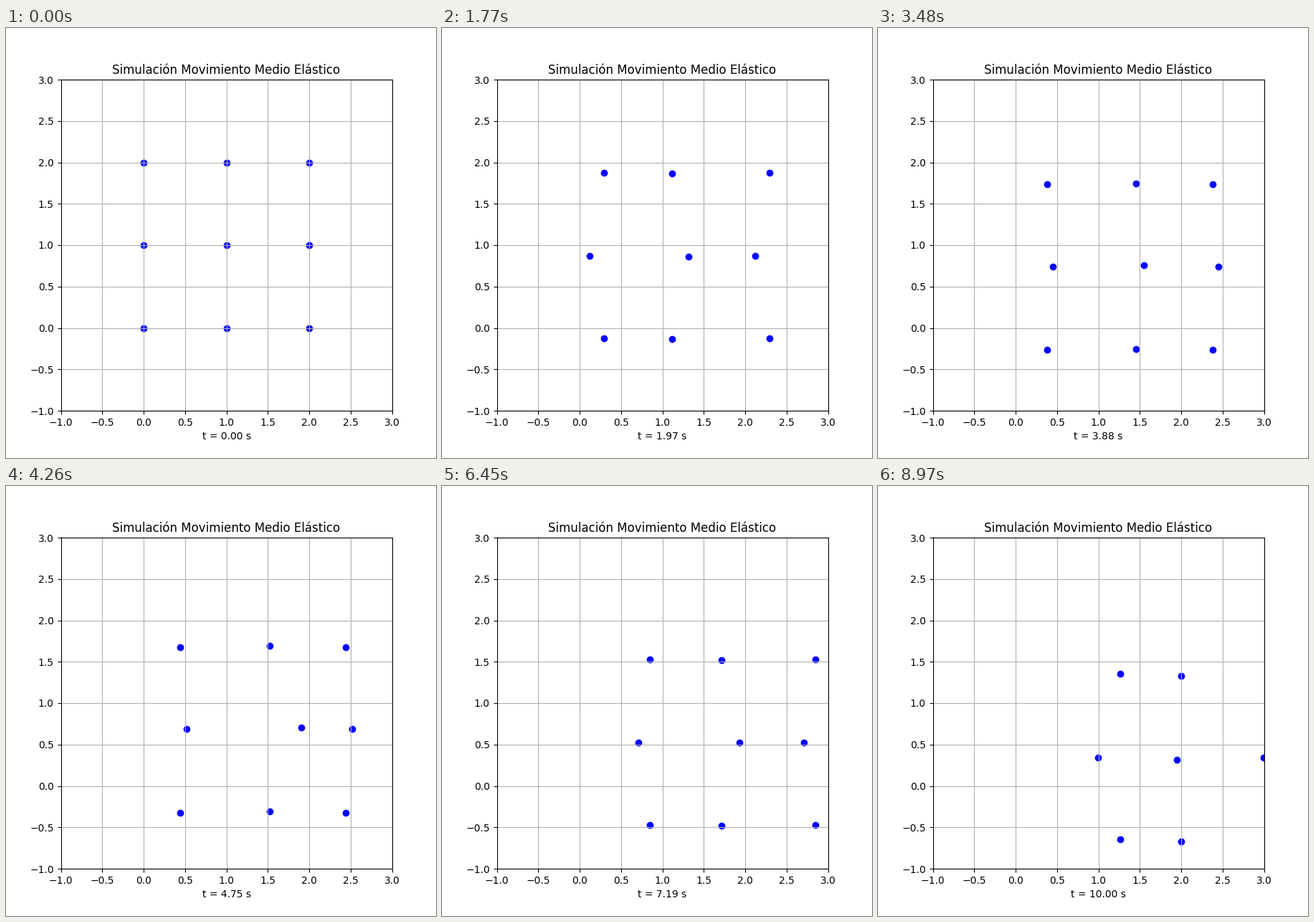
A matplotlib script for the animation above (9000 ms loop, 600 by 600 pixels).

```python
import numpy as np
import matplotlib.pyplot as plt
from matplotlib.animation import FuncAnimation

FRAMES = 300
T_END = 10
W1, W2 = np.sqrt(3), np.sqrt(6)  # lattice frequencies for unit mass and stiffness

# Rest lattice and its symmetric normal modes
X, Y = np.meshgrid(np.arange(3.0), np.arange(3.0))
bend = np.array([-0.5, 1, -0.5])
COLS = np.tile(bend, (3, 1))
ROWS = COLS.T
BOTH = np.outer(bend, bend)


def positions(t):
    a = np.sin(W1 * t) / W1
    b = np.sin(W2 * t) / W2
    ux = t / 9 + 0.2244 * a * (COLS + ROWS) - 0.4067 * b * BOTH
    uy = -0.06615 * t + a * (0.0276 * COLS + 0.0147 * ROWS)
    return np.column_stack([(X + ux).ravel(), (Y + uy).ravel()])


plt.rcParams["font.family"] = "DejaVu Sans"
fig, ax = plt.subplots(figsize=(6, 6), dpi=100)
ax.set_aspect("equal")
ax.set_xlim(-1, 3)
ax.set_ylim(-1, 3)
ax.grid(True)
ax.set_title("Simulación Movimiento Medio Elástico")
dots = ax.scatter(X.ravel(), Y.ravel(), color="blue")
label = ax.set_xlabel("t = 0.00 s")


def update(i):
    t = T_END * i / (FRAMES - 1)
    dots.set_offsets(positions(t))
    label.set_text(f"t = {t:.2f} s")
    return dots, label


anim = FuncAnimation(fig, update, frames=FRAMES, interval=30, repeat=True)
plt.show()
```
